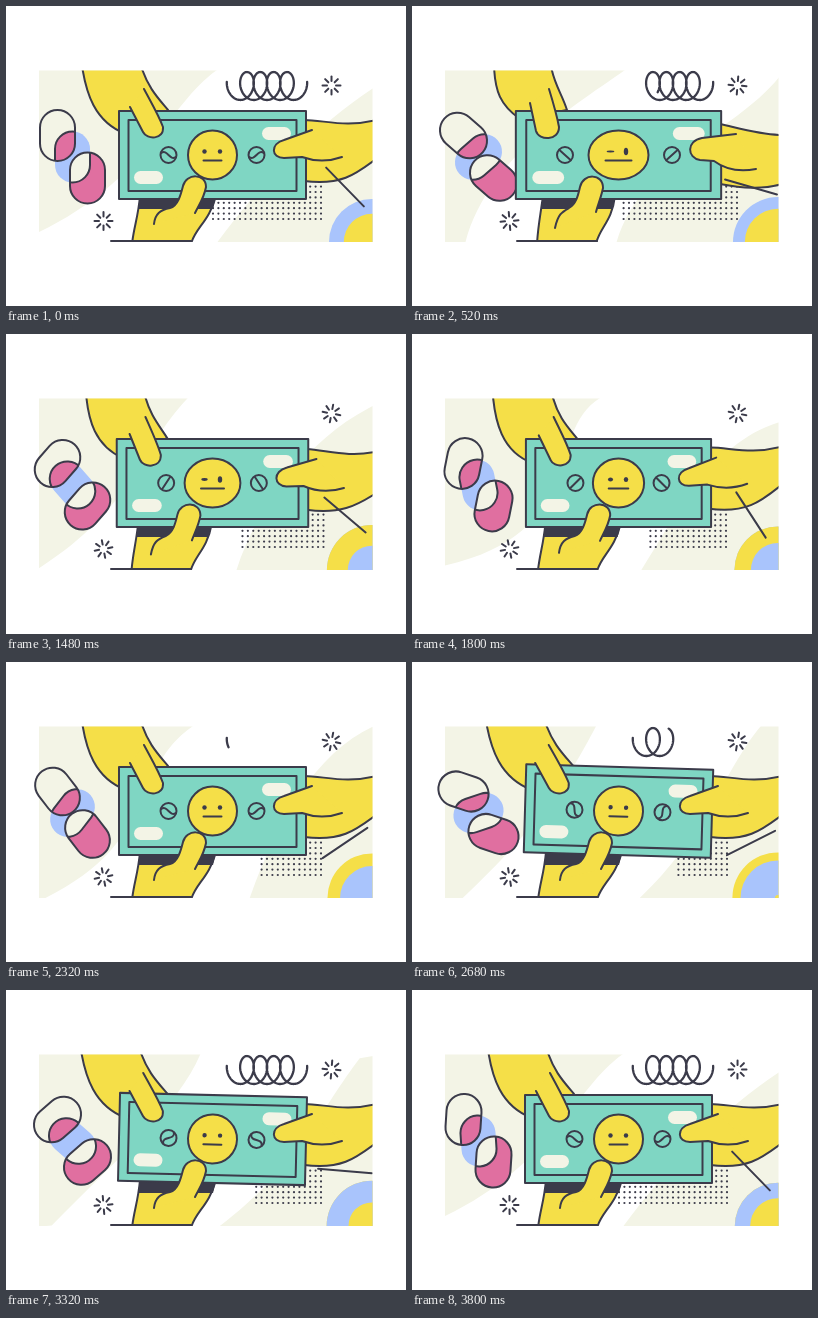
Recreate the animation shown at these times as an HTML page with a canvas. Size 400 px wide and 300 px high, loop 3840 ms.

```html
<!DOCTYPE html>
<html lang="en">
<head>
<meta charset="utf-8">
<title>Tug of money</title>
<style>
  html, body { margin: 0; width: 100%; height: 100%; overflow: hidden; background: #fff; }
  canvas { display: block; }
</style>
</head>
<body>
<canvas id="stage" width="400" height="300"></canvas>
<script>
const ctx = document.getElementById('stage').getContext('2d');
const LOOP = 3840, STEP = 40, TAU = Math.PI * 2;
const INK = '#3b3b4a', YELLOW = '#f5df48', GREEN = '#7fd6c3', CREAM = '#f3f4e6',
      BLUE = '#a9c4fc', PINK = '#e06fa0';

const lerp = (a, b, k) => a + (b - a) * k;
const clamp = v => Math.max(0, Math.min(1, v));
const smooth = v => v * v * (3 - 2 * v);
const quad = v => v < .5 ? 2 * v * v : 1 - 2 * (1 - v) ** 2;

// Blend two path strings with the same commands.
function morph(a, b, k) {
  const goal = b.match(/-?[\d.]+/g);
  let i = 0;
  return a.replace(/-?[\d.]+/g, n => lerp(+n, +goal[i++], k).toFixed(2));
}

// Value at time t along [time, value] pairs.
function track(t, keys, ease = v => v, mix = lerp) {
  const i = keys.findIndex(k => k[0] > t);
  if (i < 0) return keys[keys.length - 1][1];
  if (i === 0) return keys[0][1];
  const [t0, a] = keys[i - 1], [t1, b] = keys[i];
  return mix(a, b, ease((t - t0) / (t1 - t0)));
}

function shape(path, fill, stroke = INK) {
  if (fill) { ctx.fillStyle = fill; ctx.fill(path); }
  if (stroke) { ctx.strokeStyle = stroke; ctx.stroke(path); }
}

function ellipse(x, y, rx, ry = rx) {
  const p = new Path2D();
  p.ellipse(x, y, rx, ry, 0, 0, TAU);
  return p;
}

function box(x, y, w, h, r = 0) {
  const p = new Path2D();
  p.roundRect(x, y, w, h, r);
  return p;
}

function line(x1, y1, x2, y2) {
  const p = new Path2D();
  p.moveTo(x1, y1);
  p.lineTo(x2, y2);
  return p;
}

function clipped(path, draw) {
  ctx.save();
  ctx.clip(path);
  draw();
  ctx.restore();
}

const hands = {
  leftArm: ['M76 60 C80 86 88 116 120 128 L162 104 C152 92 142 82 135 60',
            'M82 60 C83 85 88 99 108 113 L155 104 C150 88 142 78 139 60'],
  leftFinger: ['M124 101 L137 126 C141 134 158 134 157 121 C153 110 146 98 138 83',
               'M118 97 L124 125 C127 135 147 135 147 121 C145 110 141 96 137 83'],
  rightArm: ['M298 114 C318 114 340 122 370 114 L370 153 C350 168 335 180 298 175',
             'M308 118 C330 123 350 129 370 129 L370 178 C350 184 330 182 308 178'],
  rightThumb: ['M306 124 L278 134 C264 138 265 152 278 152 L296 151 C310 156 322 156 336 151',
               'M324 128 L290 132 C274 135 275 152 288 154 L302 155 C314 164 328 166 344 163'],
  lowArm: ['M134 190 C132 212 128 220 126 238 L185 238 C189 222 203 216 210 190',
           'M131 190 C128 212 126 220 125 238 L184 238 C187 222 200 216 203 190'],
  cuff: ['M134 190 L132 203 L207 203 L210 190 Z', 'M131 190 L129 203 L200 203 L203 190 Z'],
  lowThumb: ['M148 218 C149 208 154 204 164 202 C172 200 175 188 177 180 C180 167 200 167 200 181 C198 192 193 199 189 207',
             'M143 222 C146 208 150 206 157 202 C164 198 166 190 168 181 C171 167 191 167 191 182 C189 192 186 198 184 206']
};

const leftBlob = [
  [0, 'M211 64 C160 100 140 180 20 232'], [520, 'M213 64 C170 95 75 150 53 238'],
  [1120, 'M175 64 C130 140 70 140 42 238'], [1800, 'M188 64 C130 100 180 205 20 234'],
  [2320, 'M187 64 C120 110 160 185 20 245'], [2960, 'M182 64 C180 130 100 150 65 238'],
  [3800, 'M211 64 C160 100 140 180 20 232']];
const rightBlob = [
  [0, 'M380 74 C320 110 260 170 210 238'], [520, 'M368 70 C320 130 230 150 204 238'],
  [1120, 'M340 64 C310 110 240 150 232 238'], [1800, 'M380 85 C300 100 260 190 228 238'],
  [2320, 'M368 64 C310 90 270 160 243 238'], [2960, 'M334 64 C315 120 310 190 212 238'],
  [3800, 'M380 74 C320 110 260 170 210 238']];

function blobs(t) {
  const edge = keys => track(t, keys, undefined, morph);
  shape(new Path2D(edge(leftBlob) + ' L20 238 L20 64 Z'), CREAM, null);
  shape(new Path2D(edge(rightBlob) + ' L380 238 L380 64 Z'), CREAM, null);
}

function spring(t) {
  const from = quad(clamp((t - 320) / 880)), to = quad(clamp((t - 2200) / 1100));
  const [a, b] = t < 1700 ? [from, 1] : [0, to];
  if (b - a < .002) return;
  const first = -.3, span = 9 * Math.PI + .6, n = 240, p = new Path2D();
  for (let i = 0; i <= n; i++) {
    const q = first + span * lerp(a, b, i / n);
    p.lineTo(231 + 2.12 * q - 10 * Math.cos(q), 80 + 14 * Math.sin(q));
  }
  ctx.lineWidth = 2.3;
  shape(p);
  ctx.lineWidth = 2;
}

function spark(x, y, turn) {
  for (let i = 0; i < 8; i++) {
    const a = turn + i * TAU / 8, c = Math.cos(a), s = Math.sin(a);
    shape(line(x + 4.5 * c, y + 4.5 * s, x + 9 * c, y + 9 * s));
  }
}

function dots(t, k) {
  const gap = 5.4, left = track(t, [[0, 205], [520, 200], [1120, 224], [1800, 235], [2320, 252],
    [2960, 270], [3400, 240], [3800, 205]]);
  ctx.fillStyle = INK;
  for (let x = 315; x >= left; x -= gap)
    for (let row = 0; row < 8; row++) ctx.fill(ellipse(x + 10 * k, 213 - row * gap, 1.1));
}

function rings(t) {
  const half = LOOP / 2, local = t % half;
  const [outer, inner] = t < half ? [BLUE, YELLOW] : [YELLOW, BLUE];
  const rim = track(local, [[0, 43], [520, 45], [1100, 46.5], [1500, 45], [half, 43]]);
  const grow = u => track(u, [[700, 0], [1120, 21], [1900, 28], [2430, 33], [3040, 44], [3240, 47]]);
  const disc = (r, color) => shape(ellipse(366, 236, Math.min(r, rim)), color, null);
  disc(rim, outer);
  disc(grow(local + half), inner);
  disc(grow(local), outer);
}

function capsule(x, y, angle) {
  const p = new Path2D();
  p.addPath(box(-17.5, -25.5, 35, 51, 17.5), new DOMMatrix().translate(x, y).rotate(angle));
  return p;
}

function capsules(t) {
  const turn = 360 * t / LOOP;
  const top = capsule(51.5, 129.5, -turn), mid = capsule(66.5, 151, turn),
        low = capsule(81.5, 172, -turn);
  shape(mid, BLUE, null);
  shape(top, CREAM, null);
  shape(low, PINK, null);
  clipped(mid, () => {
    shape(top, PINK, null);
    shape(low, CREAM, null);
  });
  for (const p of [top, low]) {
    clipped(p, () => shape(mid));
    shape(p);
  }
}

function coin(x, angle, bend, side) {
  ctx.save();
  ctx.translate(x, 149);
  ctx.scale(side, 1);
  shape(ellipse(0, 0, 8));
  ctx.rotate(angle * Math.PI / 180);
  shape(new Path2D(`M-7.5 0 C-3 ${-bend} 3 ${bend} 7.5 0`));
  ctx.restore();
}

function bill(t, k, late) {
  const tilt = track(t, [[2380, 0], [2640, 1.8], [2960, -1.84], [3280, 1.4], [3560, 0]], smooth);
  const spin = track(t, [[0, 15], [520, 42], [1120, 110], [1800, 135], [2320, 195],
    [2960, 270], [3800, 375]]);
  const bend = track(t, [[0, 6], [480, 0], [1850, 0], [2300, 6]]);
  const wide = 1 + .098 * k, X = x => 206.5 + (x - 206.5) * wide;
  const bar = (x, y, w, h, r, fill, stroke) => shape(box(X(x), y, w * wide, h, r), fill, stroke);
  ctx.save();
  ctx.translate(206.5, 149);
  ctx.rotate(tilt * Math.PI / 180);
  ctx.translate(-206.5, -149);
  bar(113, 105, 187, 88, 0, GREEN);
  bar(122.5, 114, 168, 71, 0);
  bar(128, 165, 29, 13, 6.5, CREAM, null);
  bar(256, 121, 29, 13, 6.5, CREAM, null);
  coin(162.5 - 9.5 * k, spin, bend, 1);
  coin(250.5 + 9.5 * k, spin, bend, -1);
  shape(ellipse(206.5, 149, 24.5 + 5.5 * late, 24.5), YELLOW);
  shape(ellipse(198.5, 145.5, lerp(2.2, 3.8, late), lerp(2.2, .9, late)), INK, null);
  shape(ellipse(214, 145.5, 2.2, lerp(2.2, 3.8, late)), INK, null);
  shape(line(197.5 - 4 * late, 154.5, 215.5 + 4 * late, 154.5));
  ctx.restore();
}

function draw(t) {
  const k = track(t, [[0, 0], [480, 1], [1180, 1.04], [1660, -.12], [1800, -.1], [2200, 0]], smooth);
  const late = track(t, [[0, 0], [480, 1], [1180, 1], [1800, .2], [2200, 0]], smooth);
  const sway = track(t, [[1180, 0], [1800, 5], [2320, 0], [2960, -3], [3560, 0]], smooth);
  const part = (name, pose, fill = YELLOW, stroke) =>
    shape(new Path2D(morph(...hands[name], pose)), fill, stroke);
  const swayed = name => {
    ctx.save();
    ctx.transform(1, 0, -sway / 66, 1, sway * 130 / 66, 0);
    part(name, k);
    ctx.restore();
  };
  const frame = box(33, 64.5, 333.5, 171.5);
  ctx.clearRect(0, 0, 400, 300);
  ctx.lineWidth = 2;
  ctx.lineCap = ctx.lineJoin = 'round';

  clipped(frame, () => {
    blobs(t);
    dots(t, k);
    rings(t);
    swayed('leftArm');
    part('rightArm', k);
    part('lowArm', late);
    part('cuff', late, INK, null);
    shape(line(105, 235, 185, 235));
  });
  capsules(t);
  clipped(frame, () => {
    bill(t, k, late);
    swayed('leftFinger');
    part('rightThumb', k);
    part('lowThumb', late);
    const a = Math.PI / 180 * track(t, [[0, 45.7], [520, 196], [1120, 200], [1800, 237],
      [2320, 326], [2960, 338], [3800, 405.7]], smooth);
    const dx = 27 * Math.cos(a), dy = 27 * Math.sin(a);
    shape(line(339 - dx, 181 - dy, 339 + dx, 181 + dy));
    spring(t);
    const turn = .2 * Math.sin(Math.PI * t / LOOP);
    spark(325.5, 79.5, turn);
    spark(97.5, 215, -turn);
  });
}

function tick() {
  draw(Math.floor(performance.now() % LOOP / STEP) * STEP);
  requestAnimationFrame(tick);
}
tick();
</script>
</body>
</html>
```
